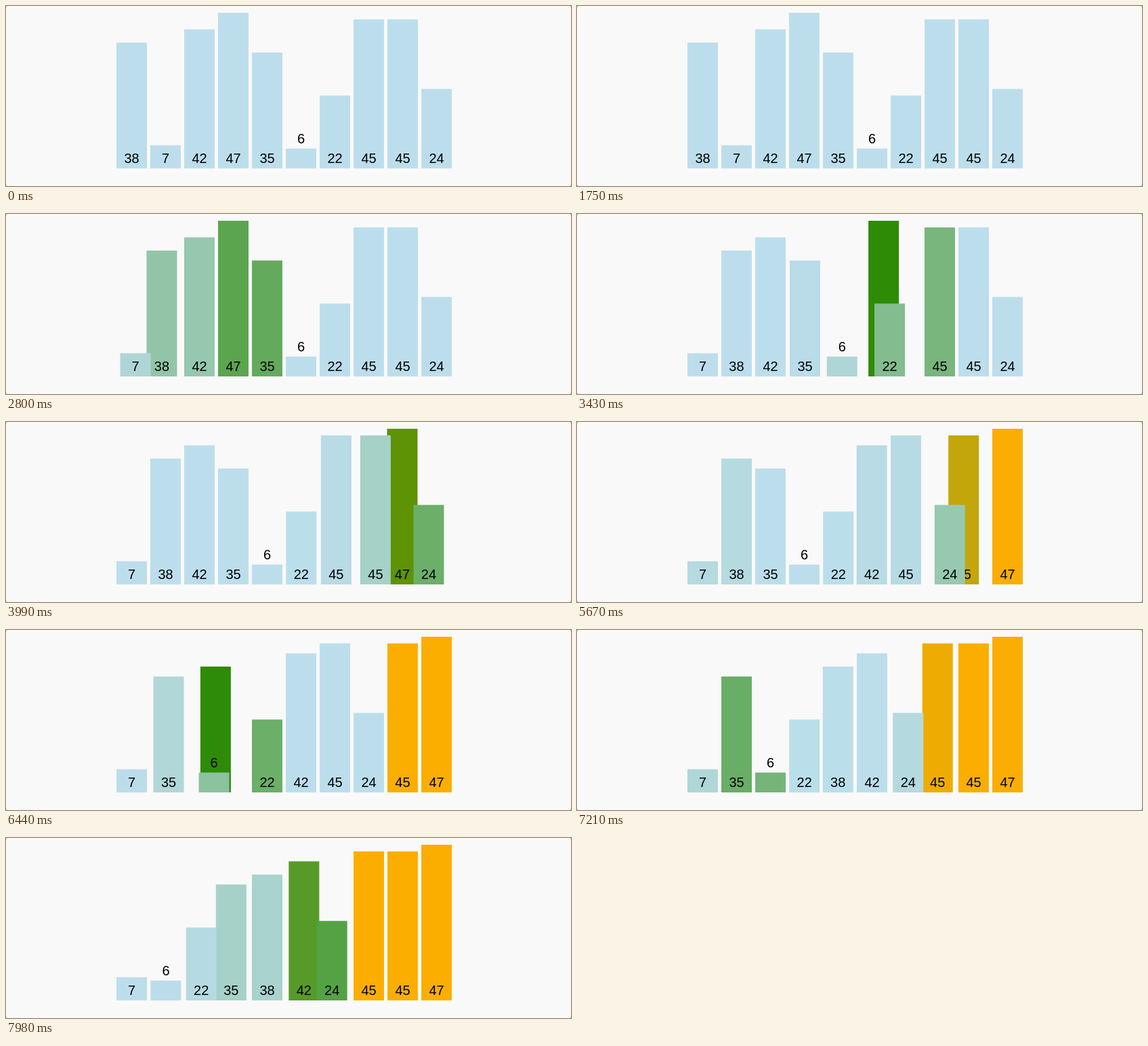
An HTML page that plays this animation: 834x266 px, repeating every 8000 ms.

```html
<!DOCTYPE html>
<html lang="en">
<head>
<meta charset="utf-8">
<title>Bubble sort</title>
<style>
  html, body { margin: 0; width: 100%; height: 100%; overflow: hidden; background: #a4a4a4; }
  svg { display: block; width: 834px; height: 266px; background: #f9f9f9; border-radius: 3px; }
  text { font: 20px "Liberation Sans", Arial, sans-serif; text-anchor: middle; fill: #000; }
</style>
</head>
<body>
<svg id="stage" viewBox="0 0 834 266"></svg>
<script>
const LOOP = 8000, START = 2215;
const LEFT = 163, PITCH = 50, WIDTH = 45, FLOOR = 240, UNIT = 230 / 47;
const BLUE = [188, 222, 236], GREEN = [46, 139, 6], ORANGE = [251, 174, 0];

// Dwell times in ms
const SWAP = 210, SWAP_AFTER_KEEP = 260;
const KEEPS = [140, 25, 200, 20, 190, 25, 145, 25, 25, 30, 135, 22];
const PAUSES = [150, 210, 245];

const stage = document.getElementById("stage");

function add(parent, tag, attrs) {
  const node = document.createElementNS("http://www.w3.org/2000/svg", tag);
  for (const name in attrs) node.setAttribute(name, attrs[name]);
  return parent.appendChild(node);
}

function makeBar(value, index) {
  const height = value * UNIT, top = FLOOR - height;
  const group = add(stage, "g", {});
  const rect = add(group, "rect", { y: top, width: WIDTH, height });
  const label = add(group, "text", { x: WIDTH / 2, y: height < 32 ? top - 8 : FLOOR - 8 });
  label.textContent = value;
  return { value, index, group, rect, moves: [], glow: [], done: [] };
}

const bars = [38, 7, 42, 47, 35, 6, 22, 45, 45, 24].map(makeBar);

// Run the sort once and record when each bar's targets change
function record() {
  const row = bars.slice();
  const keeps = KEEPS.slice(), pauses = PAUSES.slice();
  let time = START;
  for (let last = row.length - 1; last > 0 && time < LOOP; last--) {
    let kept = false;
    for (let j = 0; j < last && time < LOOP; j++) {
      const a = row[j], b = row[j + 1];
      const swaps = a.value > b.value;
      a.glow.push([time, 1]);
      b.glow.push([time, 1]);
      time += swaps ? (kept ? SWAP_AFTER_KEEP : SWAP) : keeps.shift() ?? SWAP;
      a.glow.push([time, -1]);
      b.glow.push([time, -1]);
      if (swaps) {
        row[j] = b;
        row[j + 1] = a;
        a.moves.push([time, 1]);
        b.moves.push([time, -1]);
      }
      kept = !swaps;
    }
    row[last].done.push([time, 1]);
    time += pauses.shift() ?? SWAP;
  }
}

// Critically damped spring response; overlapping steps simply add up
function spring(ms) {
  const s = ms / 100;
  return s > 0 ? 1 - (1 + s) * Math.exp(-s) : 0;
}
const total = (steps, time) =>
  steps.reduce((sum, [at, amount]) => sum + amount * spring(time - at), 0);

function draw(time) {
  for (const bar of bars) {
    const x = LEFT + PITCH * (bar.index + total(bar.moves, time));
    const glow = total(bar.glow, time), done = total(bar.done, time);
    const color = BLUE.map((c, i) =>
      Math.round(c + (GREEN[i] - c) * glow + (ORANGE[i] - c) * done));
    bar.group.setAttribute("transform", `translate(${x.toFixed(2)} 0)`);
    bar.rect.setAttribute("fill", `rgb(${color})`);
  }
}

record();
const begin = performance.now();
function tick() {
  draw((performance.now() - begin) % LOOP);
  requestAnimationFrame(tick);
}
tick();
</script>
</body>
</html>
```
